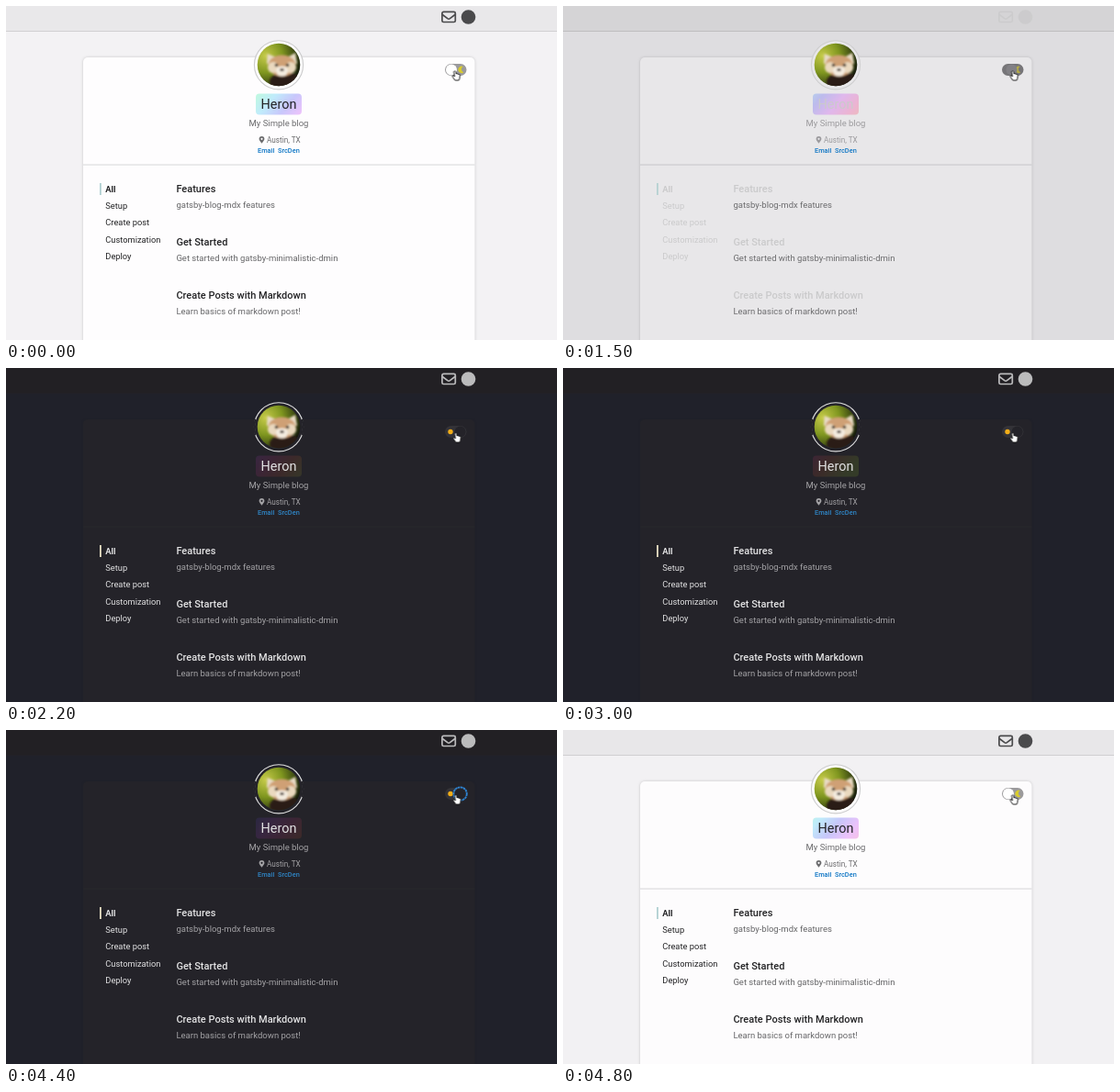
An HTML page for the animation above (4.9 s loop, 600 px wide and 364 px high).

```html
<!DOCTYPE html>
<html lang="en">
<head>
<meta charset="utf-8">
<title>Blog theme switch</title>
<style>
/* 0 = light, 1 = dark */
@property --surface { syntax: "<number>"; inherits: true; initial-value: 0; }
@property --text { syntax: "<number>"; inherits: true; initial-value: 0; }
@property --switch { syntax: "<number>"; inherits: true; initial-value: 0; }

:root {
  animation: surface 4.9s linear infinite, text 4.9s linear infinite, switch 4.9s linear infinite;
  --s: calc(var(--surface) * 100%);
  --t: calc(var(--text) * 100%);
  --w: calc(var(--switch) * 100%);
  --page: color-mix(in srgb, #20212a var(--s), #f3f2f4);
  --bar: color-mix(in srgb, #222024 var(--s), #e9e8ea);
  --bar-line: color-mix(in srgb, #232127 var(--s), #d0cfd1);
  --card: color-mix(in srgb, #242329 var(--s), #fefdfe);
  --line: color-mix(in srgb, #29282d var(--s), #dbdbdd);
  --ink: color-mix(in srgb, #e2e2e3 var(--t), #232325);
  --soft: color-mix(in srgb, #a3a2a5 var(--s), #666668);
  --tagline: color-mix(in srgb, #a3a2a5 var(--t), #6c6c6e);
  --link: color-mix(in srgb, #2f86c6 var(--s), #0b74c4);
  --mark: color-mix(in srgb, #e6dfc4 var(--s), #b0d0d2);
  --ring: color-mix(in srgb, #dededf var(--s), #cccccd);
}
html, body { margin: 0; width: 100%; height: 100%; overflow: hidden; background: var(--page); }
svg { display: block; width: 600px; height: 364px; font-family: Roboto, "Open Sans", sans-serif; }

.page { fill: var(--page); }
.bar { fill: var(--bar); }
.bar-line { fill: var(--bar-line); }
.card { fill: var(--card); filter: drop-shadow(0 0 1.6px rgb(0 0 0 / calc(.18 - .13 * var(--surface)))); }
.line { fill: var(--line); }
.icons { opacity: .8; }
.dot { fill: var(--ink); }
.mail { fill: none; stroke: var(--ink); stroke-width: 1.7; stroke-linejoin: round; }
.soft { fill: var(--soft); font-size: 9.5px; }
.tagline { fill: var(--tagline); font-size: 9.5px; }
.pin { fill: var(--tagline); fill-rule: evenodd; }
.place { font-size: 8.2px; }
.link { fill: var(--link); font-size: 7.4px; font-weight: 500; }
.menu { fill: var(--ink); font-size: 9.3px; }
.head { fill: var(--ink); font-size: 11px; font-weight: 500; }
.name { fill: var(--ink); font-size: 14.4px; }
.bold { font-weight: 700; }
.mid { text-anchor: middle; }
.mark { fill: var(--mark); }

.pad { fill: var(--card); }
.ring { fill: none; stroke: var(--ring); stroke-width: 1.1; }
.gap { fill: none; stroke: var(--card); stroke-width: 2.2; opacity: var(--surface); }
.tint { opacity: calc(.32 - .2 * var(--surface)); }
.rainbow { animation: slide 4.9s linear infinite; }

.track { fill: color-mix(in srgb, #343338 var(--w), #9b9a9c); }
.thumb {
  fill: color-mix(in srgb, #242329 calc(var(--w) * 1.6), #fff);
  transform: translateX(calc(var(--switch) * 9.6px));
}
.moon { fill: #d9cc2c; opacity: calc(1 - var(--switch)); }
.sun { fill: #f3ae18; opacity: calc(2 * var(--switch) - 1); }
.focus { fill: none; stroke: #2d83d2; stroke-width: 1.8; stroke-dasharray: 2.6 .5; animation: focus 4.9s step-end infinite; }
.hand { fill: #fff; stroke: #111; stroke-width: .9; stroke-linejoin: round; animation: drift 4.9s linear infinite; }

@keyframes surface {
  0% { --surface: 0; }
  29.8% { --surface: 0; animation-timing-function: ease; }
  37.9% { --surface: 1; }
  90.5% { --surface: 1; animation-timing-function: ease; }
  98.9%, 100% { --surface: 0; }
}
@keyframes text {
  0%, 29.2% { --text: 0; }
  30.6% { --text: .87; }
  32%, 90.6% { --text: 1; }
  92%, 100% { --text: 0; }
}
@keyframes switch {
  0%, 29.2% { --switch: 0; }
  30.6% { --switch: .35; }
  32.7%, 90.6% { --switch: 1; }
  91.9% { --switch: .3; }
  93.5%, 100% { --switch: 0; }
}
@keyframes slide {
  0% { transform: translateX(0); }
  30.6% { transform: translateX(-33px); }
  44.9% { transform: translateX(-70px); }
  61.2% { transform: translateX(-93px); }
  67% { transform: translateX(-95px); }
  89.8% { transform: translateX(-48px); }
  93.9% { transform: translateX(-24px); }
  100% { transform: translateX(-8px); }
}
@keyframes focus {
  0% { opacity: 0; }
  84.7% { opacity: 1; }
  91.5%, 100% { opacity: 0; }
}
@keyframes drift {
  0% { transform: translateX(-.5px); }
  12%, 100% { transform: translateX(.5px); }
}
</style>
</head>
<body>
<svg viewBox="0 0 600 364">
  <defs>
    <linearGradient id="hues" gradientTransform="rotate(8)">
      <stop offset="0" stop-color="hsl(150 90% 60%)"/>
      <stop offset=".155" stop-color="hsl(195 90% 60%)"/>
      <stop offset=".31" stop-color="hsl(240 90% 65%)"/>
      <stop offset=".466" stop-color="hsl(285 90% 62%)"/>
      <stop offset=".62" stop-color="hsl(330 90% 60%)"/>
      <stop offset=".776" stop-color="hsl(15 90% 58%)"/>
      <stop offset="1" stop-color="hsl(80 90% 55%)"/>
    </linearGradient>
    <radialGradient id="leaves" cx=".2" cy=".3" r=".85">
      <stop offset="0" stop-color="#c6cb4a"/>
      <stop offset=".45" stop-color="#7f961f"/>
      <stop offset="1" stop-color="#12180b"/>
    </radialGradient>
    <clipPath id="pill"><rect x="272" y="95.5" width="50" height="23" rx="4"/></clipPath>
    <clipPath id="photo"><circle cx="297" cy="64" r="23.3"/></clipPath>
    <filter id="soften"><feGaussianBlur stdDeviation=".9"/></filter>
  </defs>

  <rect class="page" width="600" height="364"/>
  <rect class="bar" width="600" height="27"/>
  <rect class="bar-line" y="27" width="600" height="1"/>
  <g class="icons">
    <g class="mail">
      <rect x="474.9" y="6.3" width="14.4" height="11.2" rx="1.6"/>
      <path d="M475 9.3 L480.8 13.6 Q482.1 14.5 483.4 13.6 L489.2 9.3"/>
    </g>
    <circle class="dot" cx="503.5" cy="12" r="7.8"/>
  </g>

  <rect class="card" x="84" y="56" width="426.5" height="330" rx="5"/>
  <rect class="line" x="84" y="172.5" width="426.5" height="1.1"/>

  <circle class="pad" cx="297" cy="64.3" r="26.6"/>
  <circle class="ring" cx="297" cy="64.3" r="26.6"/>
  <path class="gap" d="M271.8 55.8 A26.6 26.6 0 0 0 271.8 72.8 M322.2 55.8 A26.6 26.6 0 0 1 322.2 72.8"/>
  <g clip-path="url(#photo)">
    <rect x="273" y="40" width="48" height="48" fill="url(#leaves)"/>
    <g filter="url(#soften)">
      <ellipse cx="304" cy="83" rx="17" ry="11" fill="#2c1c14"/>
      <path d="M284 63 L284.5 52 L292 55 H308 L315 51 L317 63 Z" fill="#e9dcc6"/>
      <ellipse cx="300.5" cy="65" rx="15" ry="11.5" fill="#cfa074"/>
      <ellipse cx="291" cy="67" rx="6" ry="6" fill="#ead9bf"/>
      <ellipse cx="310" cy="67" rx="6" ry="6" fill="#ead9bf"/>
      <ellipse cx="300.5" cy="71" rx="6.5" ry="5.5" fill="#f4ece0"/>
      <circle cx="294.5" cy="64.5" r="1.8" fill="#2b1a14"/>
      <circle cx="306.5" cy="64.5" r="1.8" fill="#2b1a14"/>
      <ellipse cx="300.5" cy="69.5" rx="2.2" ry="1.6" fill="#2b1a14"/>
    </g>
  </g>

  <g class="tint" clip-path="url(#pill)">
    <rect class="rainbow" x="272" y="95" width="146" height="24" fill="url(#hues)"/>
  </g>
  <text class="name mid" x="297" y="112">Heron</text>
  <text class="tagline mid" x="297" y="131">My Simple blog</text>
  <path class="pin" d="M278.5 149.8 C276.4 147 275.6 146 275.6 144.8 A2.9 2.9 0 0 1 281.4 144.8 C281.4 146 280.6 147 278.5 149.8 Z M278.5 143.7 a1.1 1.1 0 1 0 .01 0 Z"/>
  <text class="tagline place" x="284" y="148.7">Austin, TX</text>
  <text class="link" x="274" y="160.4">Email</text>
  <text class="link" x="296" y="160.4">SrcDen</text>

  <rect class="mark" x="102" y="193" width="1.8" height="13"/>
  <g class="menu">
    <text class="bold" x="108.3" y="202.7">All</text>
    <text x="108.3" y="220.8">Setup</text>
    <text x="108.3" y="239.2">Create post</text>
    <text x="108.3" y="257.6">Customization</text>
    <text x="108.3" y="276.1">Deploy</text>
  </g>

  <g class="head">
    <text x="185.4" y="203">Features</text>
    <text x="185.4" y="261">Get Started</text>
    <text x="185.4" y="319">Create Posts with Markdown</text>
  </g>
  <g class="soft">
    <text x="185.4" y="219.7">gatsby-blog-mdx features</text>
    <text x="185.4" y="277.7">Get started with gatsby-minimalistic-dmin</text>
    <text x="185.4" y="335.7">Learn basics of markdown post!</text>
  </g>

  <rect class="track" x="478" y="63" width="23.5" height="13" rx="6.5"/>
  <path class="moon" d="M497.8 66 A3.7 3.7 0 1 0 498.4 72.2 A3.3 3.3 0 0 1 497.8 66 Z"/>
  <circle class="thumb" cx="485" cy="69.5" r="6"/>
  <circle class="sun" cx="484" cy="69.5" r="2.7"/>
  <circle class="focus" cx="494.6" cy="69.5" r="7.2"/>
  <path class="hand" d="M488.6 71 Q489.6 70.3 490.1 71.4 L490.7 74 Q491.8 73.3 492.3 74.2 Q493.3 73.7 493.7 74.7 Q494.9 74.5 494.9 75.8 L494.3 79 L493.6 81 H489.3 L487 77.6 Q486 76 487.2 75.7 L489 76.8 L488.1 72.3 Q488 71.4 488.6 71 Z"/>
</svg>
</body>
</html>
```
